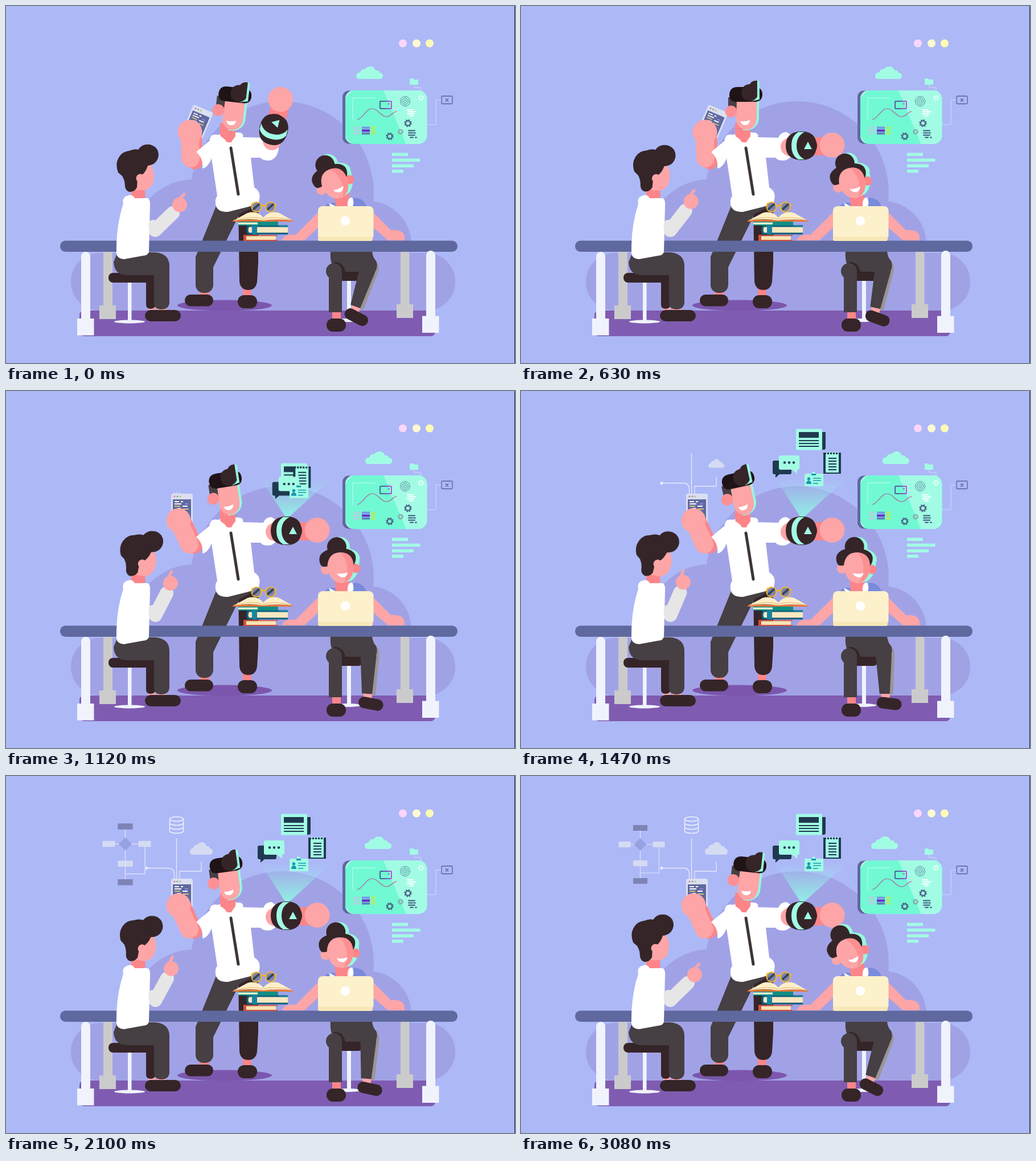
An HTML page that plays this animation: 894x626 px, repeating every 3.15 s.

```html
<!DOCTYPE html>
<html lang="en">
<head>
<meta charset="utf-8">
<title>Team at work</title>
<style>
html,body{margin:0;width:100%;height:100%;overflow:hidden;background:#adb8f7}
svg{display:block;width:100vw;height:100vh}
.ln{fill:none;stroke-linecap:round;stroke-linejoin:round}
.skin{fill:#fda5a7}.deep{fill:#fc8589}.dark{fill:#352528}.cloth{fill:#463f43}
.mint{fill:#a2fce4}.navy{fill:#1f3a50}.pale{fill:#d5dbf2}.white{fill:#fff}.leg{fill:#f0f3fc}.grey{fill:#cbcbcc}.slate{fill:#5f699f}
</style>
</head>
<body>
<svg viewBox="0 0 894 626" xmlns="http://www.w3.org/2000/svg">
<defs>
  <linearGradient id="beamFill" x1="0" y1="0" x2="0" y2="1">
    <stop offset="0" stop-color="#9cecef" stop-opacity=".04"/><stop offset="1" stop-color="#8ff0e4"/>
  </linearGradient>
  <linearGradient id="boxStroke"><stop offset=".3" stop-color="#43358c"/><stop offset="1" stop-color="#c01be0"/></linearGradient>
  <path id="puff" d="M6 22Q0 22 0 16.500Q0 11 7 10.500Q9 4 15 5Q19 0 25 0Q32 0 34 7Q40 6 41 11Q47 11 47 16.500Q47 22 41 22Z"/>
  <g id="gear"><circle r="4.200" fill="none" stroke-width="2.400"/><circle r="5.800" fill="none" stroke-width="2" stroke-dasharray="2.300 2.255"/></g>
  <path id="cross" d="M-2-2 2 2M2-2-2 2" stroke-width="1.200"/>
  <clipPath id="panel"><rect x="596" y="148" width="143.500" height="94" rx="15"/></clipPath>
</defs>

<!-- backdrop -->
<g fill="#a1a2e6">
  <circle cx="485" cy="328" r="161"/><circle cx="331" cy="414" r="110"/><circle cx="636" cy="418" r="76"/>
  <rect x="114" y="433" width="675" height="101" rx="50"/>
</g>
<rect x="129" y="534" width="625" height="45" rx="8" fill="#7f5cb1"/>
<ellipse cx="384" cy="525" rx="83" ry="9.500" fill="#7c56ad"/>
<rect x="893" width="1" height="626" fill="#17204d"/>
<circle cx="697" cy="65.500" r="7" fill="#fbd6fa"/><circle cx="721" cy="65.500" r="7" fill="#fdfad2"/><circle cx="744" cy="65.500" r="7" fill="#fdfab5"/>
<use id="cloud" href="#puff" class="mint"/>

<!-- dashboard -->
<g class="ln" stroke="#cfdcfb"><path d="M717 138V143H729V150M740 208H755V165H765"/></g>
<path class="mint" d="M709 127h6l2 2h7v9h-15z"/>
<rect x="591" y="148.500" width="40" height="93" rx="11" class="slate"/>
<g clip-path="url(#panel)">
  <path fill="#71f9d3" d="M596 148h144v95H596z"/><path fill="#a2fce4" d="M663 148h77v95h-37z"/>
  <path d="M596 163q4-9 13-15h-13zM596 228q4 9 13 15h-13z" fill="#c5fdf0"/>
</g>
<g class="ln">
  <path d="M609 199V161H648" stroke="#c5fdf0"/>
  <path d="M617 199C626 199 632 180 643 180S658 194 668 194 677 186 686 185" stroke="#b0659f" stroke-width="1.200"/>
  <rect x="657" y="167" width="20" height="13" rx="1" stroke="url(#boxStroke)" stroke-width="1.500"/>
  <rect x="765" y="158" width="19" height="13.500" rx="1.500" stroke="#5c5f98" stroke-width="1.300"/>
  <g stroke="#4f4f8b"><use href="#cross" x="774.500" y="165"/><use href="#cross" transform="translate(672.500 171.500) scale(.7)"/></g>
  <g stroke="#56869b"><circle cx="701" cy="167" r="8.500"/><circle cx="701" cy="167" r="5.500"/><circle cx="701" cy="167" r="2.500"/></g>
  <path d="M705 182h10m-9 3.500h14m-15 3.500h11m-7 3.500h6" stroke="#fff" stroke-width="2"/>
  <path d="M707 218.500h11m-11 4h7m2 0h3m-12 4h11m-8 4h5m4 0h2" stroke="#3c567c" stroke-width="2"/>
</g>
<g stroke="#4d6688"><use href="#gear" x="706" y="205.500"/><use href="#gear" x="674" y="228.500"/></g>
<use href="#gear" transform="translate(729 161) scale(.75)" stroke="#e3fff8"/><use href="#gear" transform="translate(693 220.500) scale(.75)" stroke="#8aa5a9"/>
<g stroke-width="4">
  <path d="M610 213.500h12m-12 5h12m-12 5h12" stroke="#a5d9dc"/><path d="M625 213.500h14" stroke="#749ce5"/><path d="M625 218.500h14" stroke="#7423d5"/><path d="M625 223.500h14" stroke="#5c84ba"/>
  <path d="M641 213.500h8m-8 5h8m-8 5h8" stroke="#a7ef71"/>
</g>
<path class="mint" d="M678 257.500h28v5.500h-28zM678 267.500h49.500v5.500H678zM678 277.500h38v5.500h-38zM678 287h20v5.500h-20z"/>

<!-- hologram -->
<polygon id="beam" points="448,155 570,155 497,221 491,221" fill="url(#beamFill)"/>
<g id="news">
  <path class="navy" d="M526 72h9v28q0 3-4 3h-5z"/><rect x="483" y="66.500" width="46" height="37" rx="2" class="mint"/>
  <path class="navy" d="M488 72h35v10h-35z"/><path d="M488 87h35m-35 5h35m-35 5h35" stroke="#1f3a50" stroke-width="2"/>
</g>
<g id="note">
  <path class="navy" d="M531 108h31v37h-31z"/><path class="mint" d="M535 111h23v32h-23z"/>
  <path d="M537 107v6m5-6v6m5-6v6m5-6v6m5-6v6" stroke="#a2fce4" stroke-width="1.800"/>
  <path d="M540 118h14m-14 5h14m-14 5h14m-14 5h14m-14 5h14" stroke="#1f3a50" stroke-width="1.800"/>
</g>
<g id="chat">
  <path class="navy" d="M445 122h27q3 0 3 3v18q0 3-3 3h-18l-7 6v-6h-2q-3 0-3-3v-18q0-3 3-3z"/>
  <path class="mint" d="M456 113h30q3 0 3 3v19q0 3-3 3h-1v7l-8-7h-21q-3 0-3-3v-19q0-3 3-3z"/>
  <g class="navy"><circle cx="463" cy="125.500" r="2.200"/><circle cx="471" cy="125.500" r="2.200"/><circle cx="479" cy="125.500" r="2.200"/></g>
</g>
<g id="card">
  <path class="mint" d="M499 145h12v-2q3-4 6 0v2h13q1 0 1 1v21h-33v-21z"/>
  <g fill="#1698b3"><circle cx="505.500" cy="154" r="2.700"/><path d="M501 163q0-6 4.500-6t4.500 6zM510 145h8v3h-8z"/></g>
  <path d="M513 153h14m-14 4h14m-14 5h9" stroke="#1698b3" stroke-width="1.500"/>
</g>

<!-- phone output -->
<g class="ln" stroke="#e6eafb" stroke-width="1.300">
  <path class="wire" pathLength="1" d="M299.500 180V109.500"/><path class="wire" pathLength="1" d="M295.500 180V172Q295.500 161.500 285 161.500H247"/>
  <path class="wire" pathLength="1" d="M305 180V167H343V151"/>
</g>
<circle id="dot" cx="247" cy="161.500" r="2.600" fill="#e6eafb"/>
<g id="puffSmall"><use href="#puff" class="pale" transform="translate(-20 -11) scale(.85 1)"/></g>
<g id="db" class="ln" stroke="#eef1fd" stroke-width="1.500">
  <ellipse cy="-10.500" rx="12" ry="4"/><path d="M-12-10.500V10.500a12 4 0 0 0 24 0V-10.500M-12-3.500a12 4 0 0 0 24 0M-12 3.500a12 4 0 0 0 24 0"/>
</g>
<g id="flow">
  <path class="ln" stroke="#dfe5fa" stroke-width="1.200" d="M0-47V46M-28-18H33V32H0"/>
  <path fill="#7d84b5" d="M-12.500-52h25v10h-25zM-12.500 41h25v10h-25z"/>
  <path class="pale" d="M-38-23h21v10h-21zM22-23h21v10H22zM-12.500 10h25v10h-25z"/><path fill="#98a1e0" d="M0-29 11-18 0-7-11-18z"/>
</g>

<!-- far table legs -->
<path class="grey" d="M171 425h16v100h6v24h-29v-24h7zM693 425h15.500v98h6.500v24h-29v-24h7z"/>

<!-- standing man -->
<path class="deep" d="M340 495h17v18h-17zM416 490h15v22h-15z"/>
<path class="dark" d="M408 350h35v100l-2 33q-2 15-15.500 15t-15.500-15z"/>
<path class="cloth" d="M371 346L433 353 410 365 364 458H333V440Z"/>
<rect x="333" y="430" width="31" height="73" rx="14" class="cloth"/>
<rect x="314" y="506" width="50" height="20.500" rx="10" class="dark"/><rect x="407" y="507" width="34" height="23" rx="11" class="dark"/>
<g id="phoneArm">
  <rect x="290" y="180" width="38" height="52" rx="3.500" fill="#dadff2"/><path class="slate" d="M293 190h32v38h-32z"/>
  <circle cx="296" cy="185" r="1.500" fill="#dd6fa6"/><circle cx="301" cy="185" r="1.500" fill="#62b394"/><circle cx="306" cy="185" r="1.500" fill="#d9b957"/>
  <path d="M296 194h8m3 0h4M296 198h12m-7 8h6m3-4h9" stroke="#fff" stroke-width="1.800"/><path d="M296 202h10m5 5h10" stroke="#d8c176" stroke-width="1.800"/><path d="M314 198h6m-20 12h14" stroke="#9b82e6" stroke-width="1.800"/>
  <path class="ln" d="M314 234 331 271" stroke="#fc8589" stroke-width="28"/><path class="ln" d="M305 232 322 269" stroke="#fda5a7" stroke-width="32"/>
  <circle cx="303" cy="227" r="21.500" class="skin"/>
</g>
<path class="white" d="M359 235Q357 223 372 226Q387 221 411 222Q418 224 416 230L452 231Q456 221 466 221Q478 226 479 247Q478 268 462 271Q450 271 447 266H430L436 318Q448 325 445 339Q445 348 434 350L390 361Q369 362 368 346Q367 338 371 333L361 267Q355 283 345 285Q347 267 334 256Z"/>
<g id="watchArm">
  <circle cx="472" cy="247" r="16" class="skin"/><rect x="505" y="230" width="34" height="32" class="deep"/>
  <circle cx="546.500" cy="244" r="22" class="skin"/>
  <path class="dark" d="M490 220H496Q519 222 519 245T496 270H490Q465 268 465 245T490 220Z"/>
  <path class="mint" d="M487 221H498Q484 228 484 245T498 269H487Q475 262 475 245T487 221Z"/>
  <circle cx="503" cy="245" r="17" class="dark"/><path class="mint" d="M504 238 511 251H497Z"/>
</g>
<path class="ln" d="M395 249 408 330" stroke="#3d3539" stroke-width="5"/>
<path class="deep" d="M376 205H403V233Q398 242 386 238 376 234 376 222Z"/>
<path class="white" d="M357 234Q364 221 376 228T387 239L372 246ZM401 231Q410 218 416 226L414 238 396 238Z"/>
<g id="manHead">
  <path d="M400 160H418V198Q416 214 399 218H390Z" fill="#97f8de"/>
  <path class="cloth" d="M364 160h20v28h-20z"/>
  <path class="skin" d="M379 165H414V196Q413 216 395 217 379 215 378 198Z"/>
  <circle cx="369" cy="185" r="10.500" fill="#fc9195"/>
  <path d="M376 168Q366 167 366 155 367 142 381 142H411Q424 143 424 155 424 167 412 168Z" fill="#1f1316"/>
  <path d="M405 134Q413 129 419 132V164L405 167Z" fill="#97f8de"/>
  <path class="dark" d="M387 152Q388 138 402 137 406 130 415 131V159Q411 166 402 167 388 166 387 152Z"/>
  <path class="white" d="M385 202Q394 203 402 200 402 208 394 209 387 209 385 202Z"/>
</g>

<!-- seated woman -->
<path class="leg" d="M599 480h7v72h-7z"/><ellipse cx="600" cy="551" rx="24" ry="3" class="leg"/>
<rect x="580" y="465" width="46" height="17" rx="7" class="dark"/>
<g id="shin">
  <path d="M637 440Q656 444 656 464L654 532H638Z" fill="#9b9596"/><path class="skin" d="M633 528h15v14h-15z"/>
  <path class="cloth" d="M622 455H648L651 464 648 531H630Z"/>
  <rect x="625" y="538" width="44" height="20" rx="10" class="dark" transform="rotate(7 647 548)"/>
</g>
<path class="cloth" d="M570 430H643Q644 441 650 447 655 460 645 470 633 477 625 466H582Q568 455 570 430Z"/>
<path class="dark" d="M576 449Q592 448 596 466L590 481H576Z"/>
<circle cx="576" cy="465" r="14" class="cloth"/><path class="cloth" d="M567 465h23v72h-23z"/>
<path class="deep" d="M573 537h15v14h-15z"/><rect x="563" y="548" width="34" height="23" rx="11" class="dark"/>

<!-- table -->
<rect x="95" y="411.500" width="698" height="19.500" rx="9.500" class="slate"/>
<path class="leg" d="M132 439a8 8 0 0 1 16 0V548h6.500v29.500H125V548h7zM738 437a8 8 0 0 1 16 0V543.500h6.500V573H731V543.500h7z"/>

<!-- seated man -->
<path class="leg" d="M214 480h6.500v72h-6.500z"/><ellipse cx="217" cy="553.500" rx="27" ry="3" class="leg"/>
<rect x="180" y="468" width="84" height="17" rx="8" class="dark"/>
<path class="skin" d="M250 522h12v13h-12zM265 522h16v13h-16z"/>
<path class="dark" d="M235 466H263V523Q262 531 254 531 246 531 246 523V483Z"/>
<path class="cloth" d="M196 432H262Q287 434 287 456V520Q286 532 273 532 260 532 260 520V472H212Q190 471 189 449Z"/>
<rect x="244" y="533" width="63" height="20" rx="10" class="dark"/>
<path class="deep" d="M220 312H243L245 335Q234 343 220 335Z"/>
<path class="white" d="M206 347Q203 335 215 332 222 330 226 337L249 337Q254 340 253 350L251 430Q251 437 240 438L207 444Q195 443 194 434 193 386 206 347Z"/>
<path class="ln" d="M259 386 263 393" stroke="#e6e6e6" stroke-width="22"/>
<g id="pointArm">
  <path class="ln" d="M262 393 293 363" stroke="#e6e6e6" stroke-width="24"/>
  <circle cx="305" cy="348.500" r="13" class="skin"/><path class="ln" d="M303 340 313 330" stroke="#fda5a7" stroke-width="5"/>
</g>
<path class="white" d="M236 365 252 374Q249 386 252 397L236 420Z"/>
<g id="leftHead">
  <path class="skin" d="M228 277H253Q260 286 260 299 259 318 245 323H226Z"/>
  <path class="dark" d="M197 292Q193 282 195 273 200 256 216 254 226 250 232 252 239 241 253 243 268 247 268 262 266 278 249 280 246 291 237 298L231 302 230 318Q226 326 217 326 210 324 209 316 209 306 204 298Z"/>
  <circle cx="236" cy="302" r="7.500" class="skin"/>
</g>

<path class="skin" d="M552 358 509 401Q489 399 485 409V411H524L552 385ZM641 358 676 393Q698 391 700 405V411H671L641 385Z"/>
<path d="M560 352Q563 344 574 345L603 347 612 336Q629 337 633 352Z" fill="#7a8bdc"/>
<path class="deep" d="M577 325H603V352H579Z"/>
<path class="white" d="M567 345 582 353H570ZM600 352Q599 335 608 336 613 345 608 353Z"/>
<g id="girlHead">
  <g fill="#97f8de"><circle cx="592" cy="273" r="17"/><ellipse cx="593" cy="295" rx="32" ry="20"/><path d="M613 295H624Q624 324 607 334L590 337Z"/></g>
  <circle cx="564" cy="311" r="9" class="skin"/><circle cx="616.500" cy="313" r="8" class="deep"/>
  <g class="dark"><circle cx="586" cy="273" r="17"/><path d="M559 306Q553 302 554 291 557 276 586 275 617 277 618 293 618 302 613 307Z"/></g>
  <path class="skin" d="M567 306Q570 283 590 283 613 284 613 307 612 335 590 337 569 334 567 306Z"/>
  <path d="M591 283Q613 285 613 307 612 332 594 336 604 320 601 303 599 290 591 283Z" fill="#fc8f92"/>
  <path class="white" d="M583 319Q592 322 602 319 600 327 593 327 585 326 583 319Z"/>
</g>
<rect x="548" y="351" width="97.500" height="59" rx="8" fill="#fdf1cb"/><path fill="#f8e7b8" d="M548 404.500H644V409q0 3-3 3H551q-3 0-3-3z"/>
<circle cx="596" cy="377" r="8.300" class="white"/>

<!-- books -->
<path fill="#d4503f" d="M417 401.500h60v2h-60zM417 410h60v2h-60z"/><path fill="#f8e3b3" d="M418 403.500h56v6.500h-56z"/><path fill="#d4503f" d="M417 401.500h5v10.500h-5z"/>
<path fill="#0d5c7d" d="M424 384.500h71v16h-71q-4-8 0-16z"/><path fill="#f8e8c0" d="M427 387.500h68v10h-68q-3-5 0-10z"/><path fill="#1685a0" d="M432 384.500h9v16h-9zM480 384.500h15v3h-15z"/>
<path fill="#0f8d84" d="M408 377h70v8h-70z"/><path fill="#f8f0cf" d="M408 379.500h34v3.500h-34z"/>
<path fill="#e67636" d="M397 378 401 374.500H501L505 378Z"/>
<path fill="#fdefc8" d="M400 376 424 363Q441 358 452 371 463 358 480 363L503 376Q474 372 452 376 430 372 400 376Z"/>
<path class="ln" d="M402 375.500Q436 367 452 374 468 367 501 375.500" stroke="#e3b26c"/>
<g class="ln" stroke="#f3b52b" stroke-width="2.200">
  <circle cx="440" cy="352.500" r="8.500" fill="#7f86ad"/><circle cx="464.500" cy="352.500" r="8.500" fill="#7f86ad"/>
  <path d="M449 351q3.500-3 7 0M431 350l2-4M473 350l2-2"/>
  <path d="M435 356 444 348M460 356 469 348" stroke="#37465c" stroke-width="4"/>
</g>
</svg>
<script>
const LOOP = 3150, STEP = 70;
const $ = id => document.getElementById(id);
const wires = document.querySelectorAll('.wire');
const lin = (t, a, b) => Math.min(1, Math.max(0, (t - a) / (b - a)));
const ease = (t, a, b) => (1 - Math.cos(Math.PI * lin(t, a, b))) / 2;
const set = (id, transform) => $(id).setAttribute('transform', transform);
const turn = (id, angle, x, y) => set(id, `rotate(${angle} ${x} ${y})`);
const pop = (id, x, y, scale) => set(id, `translate(${x} ${y}) scale(${scale})`);
const fade = (id, value) => $(id).setAttribute('opacity', value);

// Icons leave a shared stack: offset from their resting place.
const icons = { news: [0, 61], note: [-27, 25], chat: [26, 38], card: [0, 21] };

function draw(t) {
  const sway = (1 - Math.cos(2 * Math.PI * t / LOOP)) / 2;
  set('cloud', `translate(${615 + 20 * sway} 106)`);
  turn('manHead', 6.5 - 19 * sway, 392.5, 219);
  turn('leftHead', 8.5 * sway, 230, 330);
  turn('pointArm', -23 * sway, 262, 392);
  turn('girlHead', -22 * (1 - sway), 588, 342);
  turn('shin', 20 * (1 - sway), 638, 457);

  turn('watchArm', -76 * (1 - ease(t, 0, 560)), 463, 245);
  turn('phoneArm', 23 * (1 - ease(t, 630, 1050)), 328, 273);

  const glow = ease(t, 700, 980);
  set('beam', `translate(494 221) scale(${glow}) translate(-494 -221)`);
  const away = 1 - ease(t, 1100, 1400);
  for (const id in icons) {
    const [x, y] = icons[id];
    set(id, `translate(${x * away} ${y * away})`);
    fade(id, ease(t, 910, 1100));
  }

  const drawn = ease(t, 1080, 1450);
  wires.forEach(w => {
    w.setAttribute('stroke-dasharray', `${drawn} 2`);
    w.setAttribute('visibility', drawn ? 'visible' : 'hidden');
  });
  fade('dot', lin(t, 1380, 1450));
  pop('puffSmall', 343, 127, ease(t, 1350, 1540));
  pop('db', 299.5, 86, ease(t, 1540, 1750) * (1.08 - .08 * lin(t, 1750, 2030)));
  pop('flow', 209.5, 138, ease(t, 1680, 1930) * (1.06 - .06 * lin(t, 1930, 3080)));
}

function tick() {
  const t = performance.now() % LOOP;
  draw(Math.floor(t / STEP) * STEP);
  requestAnimationFrame(tick);
}
tick();
</script>
</body>
</html>
```
